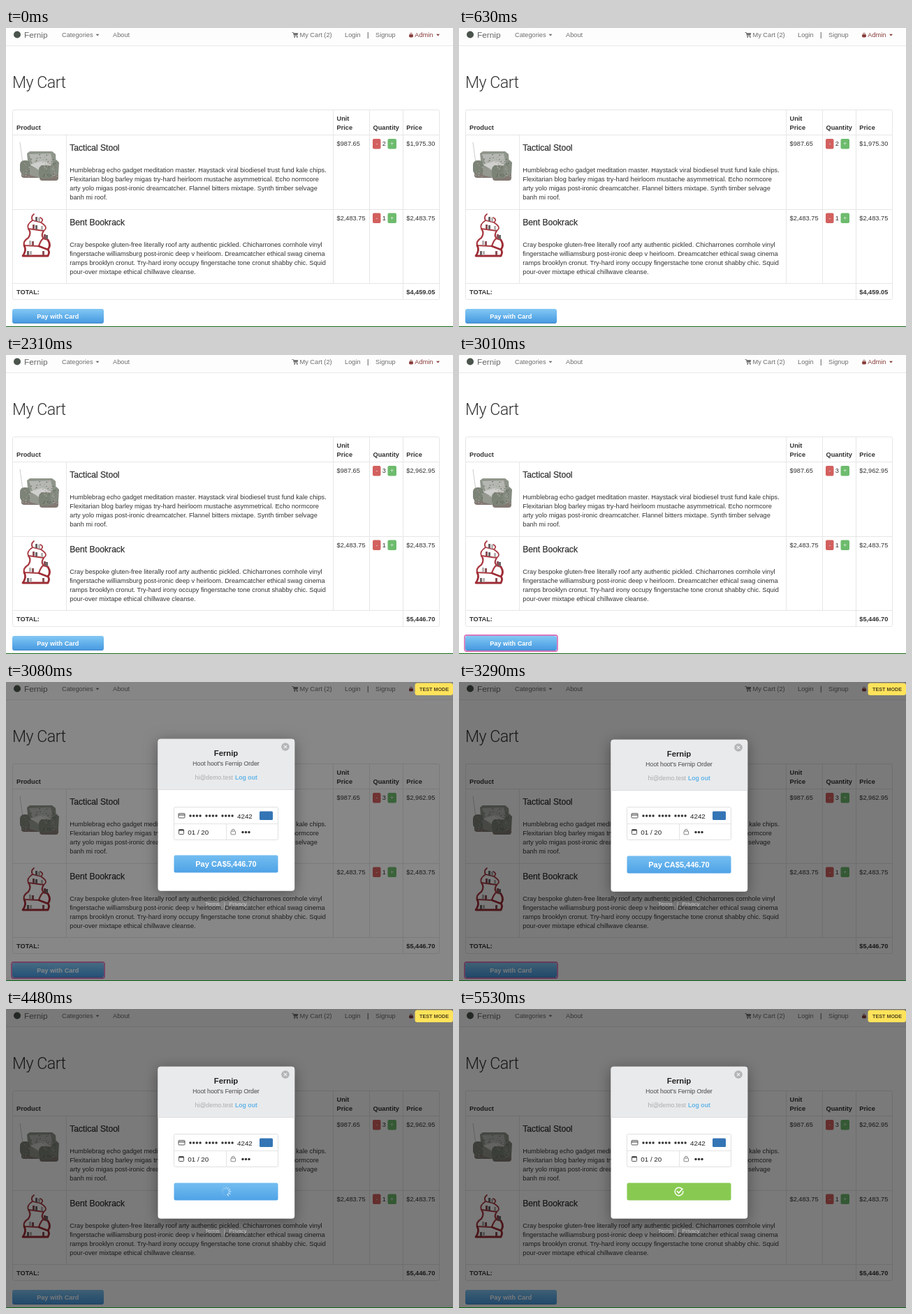
Write an HTML page with a canvas that moves like this. It is 640 px wide and 429 px high and loops after 5.6 s.

```html
<!DOCTYPE html>
<html lang="en">
<head>
<meta charset="utf-8">
<title>My Cart</title>
<style>
html, body { margin: 0; width: 100%; height: 100%; overflow: hidden; background: #fff; }
canvas { display: block; }
</style>
</head>
<body>
<canvas id="stage" width="640" height="429"></canvas>
<script>
const ctx = document.getElementById('stage').getContext('2d');
const LOOP = 5600, STEP = 70;
const TIMES = { plus: 1260, quantity: 1820, pay: 2590, modal: 3080, settle: 3150, send: 4200, done: 5110 };
const SANS = '"Liberation Sans", Arial, sans-serif';
const BODY = 9.23;

function text(str, x, y, o = {}) {
  const { size = BODY, weight = 400, color = '#333', align = 'left', medium = 0, family = SANS, spacing = 0 } = o;
  ctx.font = `${weight} ${size}px ${family}`;
  ctx.letterSpacing = `${spacing}px`;
  ctx.textAlign = align;
  ctx.fillStyle = color;
  ctx.fillText(str, x, y);
  if (medium) {
    ctx.strokeStyle = color;
    ctx.lineWidth = medium;
    ctx.strokeText(str, x, y);
  }
}

function box(x, y, w, h, r, fill, stroke, width = 1) {
  ctx.beginPath();
  ctx.roundRect(x, y, w, h, r);
  if (fill) { ctx.fillStyle = fill; ctx.fill(); }
  if (stroke) { ctx.strokeStyle = stroke; ctx.lineWidth = width; ctx.stroke(); }
}

function poly(points, fill) {
  ctx.beginPath();
  points.forEach(([x, y]) => ctx.lineTo(x, y));
  ctx.closePath();
  ctx.fillStyle = fill;
  ctx.fill();
}

function line(points, color, width = 1) {
  ctx.beginPath();
  points.forEach(([x, y]) => ctx.lineTo(x, y));
  ctx.strokeStyle = color;
  ctx.lineWidth = width;
  ctx.stroke();
}

function curve(path, color, width) {
  ctx.strokeStyle = color;
  ctx.lineWidth = width;
  ctx.stroke(new Path2D(path));
}

function disc(x, y, r, fill) {
  ctx.beginPath();
  ctx.arc(x, y, r, 0, Math.PI * 2);
  ctx.fillStyle = fill;
  ctx.fill();
}

function vertical(y0, y1, ...colors) {
  const g = ctx.createLinearGradient(0, y0, 0, y1);
  colors.forEach((c, i) => g.addColorStop(i / (colors.length - 1), c));
  return g;
}

const caret = (x, y, color) => poly([[x, y], [x + 5, y], [x + 2.5, y + 2.7]], color);

function padlock(x, y, w, h, color, filled) {
  box(x, y, w, h, 0.8, filled && color, color, 0.8);
  ctx.beginPath();
  ctx.arc(x + w / 2, y - 0.8, w * 0.3, Math.PI, 0);
  ctx.lineTo(x + w * 0.8, y);
  ctx.moveTo(x + w * 0.2, y - 0.8);
  ctx.lineTo(x + w * 0.2, y);
  ctx.stroke();
}

function nav() {
  const gray = { color: '#6d6d6d' }, red = '#873c3a';
  ctx.fillStyle = '#fdfdfd';
  ctx.fillRect(0, 0, 640, 25);
  line([[0, 25.5], [640, 25.5]], '#e9e9e9');
  disc(16, 9.5, 5, '#4b544c');
  text('Fernip', 26, 14, { size: 11.8, color: '#666' });
  text('Categories', 80, 13, gray);
  caret(128.5, 8.7, '#6d6d6d');
  text('About', 153, 13, gray);
  line([[409.5, 6.5], [411.3, 6.5], [412.6, 11.3], [417.5, 11.3]], '#666', 0.9);
  poly([[411.6, 7.2], [418.3, 7.2], [417.5, 10.2], [412.5, 10.2]], '#666');
  disc(413.2, 13, 0.9, '#666');
  disc(416.9, 13, 0.9, '#666');
  text('My Cart (2)', 420.5, 13, gray);
  text('Login', 485, 13, gray);
  text('|', 517, 13);
  text('Signup', 529, 13, gray);
  padlock(577.5, 9.5, 5, 3.5, red, true);
  text('Admin', 585.3, 13, { color: red });
  caret(616, 8.7, red);
}

function armchair() {
  line([[20, 164], [24, 194]], '#aaa', 0.6);
  box(22, 206, 28, 9, 4, '#837973');
  box(48, 207, 27, 12, 4, '#837973');
  poly([[30, 180], [34, 177], [66, 177], [71, 181], [72, 197], [50, 204], [32, 200]], '#8f958a');
  poly([[33, 181], [64, 180], [67, 194], [38, 195]], '#b5b8b2');
  poly([[34, 196], [52, 191], [66, 196], [48, 204]], '#cfd0ce');
  box(20, 190, 15, 20, 6, '#7c8377');
  poly([[34, 199], [48, 204], [48, 215], [34, 211]], '#94988f');
  box(47, 197, 19, 19, 6, '#7c8377');
  poly([[63, 198], [72, 189], [76, 193], [75, 210], [64, 215]], '#858b80');
  let seed = 7;
  const random = () => (seed = seed * 16807 % 2147483647) / 2147483647;
  const tones = ['#5f665a', '#b4b6b0', '#b09a94', '#707d6c'];
  for (let i = 0; i < 110; i++) {
    const x = 22 + random() * 51, y = 180 + random() * 34;
    ctx.fillStyle = tones[i % 4];
    if (y > 192 ? x < 34 || x > 49 : x > 33 && x < 67) ctx.fillRect(x, y, 1.5, 1.2);
  }
}

function bookrack() {
  ctx.lineCap = ctx.lineJoin = 'round';
  curve('M40 267 Q35 271 38 276 L50 279 Q55 275 49 272 M38 276 Q29 282 32 288 L54 291 Q60 287 54 282 L50 279', '#a93b43', 1.8);
  curve('M32 288 Q37 294 32 301 M54 291 Q50 297 53 301 M32 301 Q24 306 26 312 L47 313 Q49 306 53 302 L60 304', '#a93b43', 2.2);
  curve('M60 304 Q65 312 60 318 L47 313 M26 312 Q30 319 24 327 L60 327 Q63 321 60 318', '#9e2c35', 2.8);
  ctx.lineCap = 'butt';
  ctx.lineJoin = 'miter';
  const books = [[42, 271], [46, 272], [38, 282], [42, 283], [50, 284], [54, 296], [57, 297], [33, 305], [37, 306], [30, 320], [34, 320], [52, 320]];
  books.forEach(([x, y], i) => box(x, y, 3, 6, 0, ['#6b6466', '#b7b1b1', '#8c5056'][i % 3]));
}

function quantity(y, count, focused) {
  box(525, y, 11.5, 14.5, 2, '#d2605e');
  text('-', 531, y + 10, { color: '#f3cfce', align: 'center' });
  text(count, 538.8, y + 10);
  if (focused) box(545.7, y - 0.5, 14, 15.5, 2.5, null, '#795d65', 2);
  box(546.5, y, 12.5, 14.5, 2, focused ? '#4b8f4b' : '#6dbb6d');
  text('+', 552.7, y + 10, { color: '#d5edd5', align: 'center' });
}

function product(top, name, lines, unit, total) {
  text(name, 91.3, top + 22.5, { size: 12.1, medium: 0.25 });
  lines.forEach((str, i) => text(str, 91.3, top + 53.7 + i * 13));
  text(unit, 473.5, top + 15.5);
  text(total, 573.3, top + 15.5);
}

function cart(t) {
  const more = t >= TIMES.quantity;
  const bold = { weight: 700 };
  const border = '#e6e6e6';
  text('My Cart', 9, 86, { size: 23.2, weight: 300, family: 'Roboto, sans-serif', spacing: -0.5 });

  box(9.5, 117.5, 611, 272, 2, null, border);
  [153.5, 260.5, 366.5].forEach(y => line([[9.5, y], [620.5, y]], border));
  line([[86.5, 153], [86.5, 366]], border);
  [468.5, 520.5].forEach(x => line([[x, 118], [x, 366]], border));
  line([[568.5, 118], [568.5, 389]], border);

  text('Product', 15, 145.5, bold);
  text('Unit', 473.5, 132.5, bold);
  text('Price', 473.5, 145.5, bold);
  text('Quantity', 525.5, 145.5, bold);
  text('Price', 573.3, 145.5, bold);

  armchair();
  product(153.5, 'Tactical Stool', [
    'Humblebrag echo gadget meditation master. Haystack viral biodiesel trust fund kale chips.',
    'Flexitarian blog barley migas try-hard heirloom mustache asymmetrical. Echo normcore',
    'arty yolo migas post-ironic dreamcatcher. Flannel bitters mixtape. Synth timber selvage',
    'banh mi roof.'
  ], '$987.65', more ? '$2,962.95' : '$1,975.30');
  quantity(159, more ? 3 : 2, t >= TIMES.plus && !more);

  bookrack();
  product(260.2, 'Bent Bookrack', [
    'Cray bespoke gluten-free literally roof arty authentic pickled. Chicharrones cornhole vinyl',
    'fingerstache williamsburg post-ironic deep v heirloom. Dreamcatcher ethical swag cinema',
    'ramps brooklyn cronut. Try-hard irony occupy fingerstache tone cronut shabby chic. Squid',
    'pour-over mixtape ethical chillwave cleanse.'
  ], '$2,483.75', '$2,483.75');
  quantity(265.5, 1, false);

  text('TOTAL:', 15, 382, bold);
  text(more ? '$5,446.70' : '$4,459.05', 573.3, 382, bold);

  if (t >= TIMES.pay && t < TIMES.send) box(8, 402, 133, 23, 3, null, '#d878bd', 1.8);
  box(9, 403, 131, 21, 3, vertical(403, 424, '#84c8f4', '#62b0ea', '#4697df'));
  line([[11, 423.5], [138, 423.5]], '#4288c6');
  text('Pay with Card', 74.3, 417, { size: 9.1, weight: 700, color: '#fff', align: 'center' });
}

function spinner(t, x, y) {
  const head = (Math.floor((t - TIMES.send) / STEP) + 1) % 12;
  for (let i = 0; i < 12; i++) {
    const a = i * Math.PI / 6 - Math.PI / 2, age = (head - i + 12) % 12;
    const at = r => [x + Math.cos(a) * r, y + Math.sin(a) * r];
    line([at(3.7), at(7.2)], `rgba(255,255,255,${Math.max(0.12, 0.95 - age * 0.1)})`, 1.1);
  }
}

function payButton(t) {
  const done = t >= TIMES.done;
  box(240.5, 249.5, 149, 25, 2.5, done ? '#88ca51' : vertical(250, 274, '#73bdf1', '#4fa3e6'));
  if (done) {
    ctx.beginPath();
    ctx.arc(315, 262, 5.8, -0.15, Math.PI * 1.75);
    ctx.strokeStyle = '#fff';
    ctx.lineWidth = 1.4;
    ctx.stroke();
    line([[312, 261.2], [314.6, 264], [320.5, 257.5]], '#fff', 1.8);
  } else if (t >= TIMES.send) {
    spinner(t, 315, 262);
  } else {
    text('Pay CA$5,446.70', 315, 265.6, { size: 11, weight: 700, color: '#fff', align: 'center' });
  }
}

function fields() {
  const dark = { size: 9.8, color: '#222' };
  const dots = (x, count) => {
    for (let i = 0; i < count; i++) disc(x + i * 4.7, 192, 1.7, '#333');
  };
  box(240.5, 179.5, 149, 47, 2, '#fff', '#e0e0e0');
  line([[241, 203.5], [389, 203.5]], '#e4e4e4');
  line([[315.5, 203], [315.5, 226]], '#e4e4e4');

  box(247, 188.5, 9, 6.5, 1, null, '#444', 0.9);
  line([[247, 190.7], [256, 190.7]], '#444', 1.2);
  [264, 287, 310].forEach(x => dots(x, 4));
  text('4242', 331, 195.5, dark);
  box(363, 185.5, 19, 12.5, 1.5, '#3475b5');

  box(247.5, 211.5, 7, 7, 0.8, null, '#444', 0.9);
  line([[247.5, 212.7], [254.5, 212.7]], '#444', 1.6);
  text('01 / 20', 260.3, 219, dark);
  padlock(322, 214, 6.5, 4.8, '#666', false);
  [339, 343.5, 348].forEach(x => disc(x, 215.5, 1.7, '#333'));
}

function modal(t) {
  const opening = t < TIMES.settle;
  ctx.fillStyle = `rgba(0,0,0,${opening ? 0.47 : 0.52})`;
  ctx.fillRect(0, 0, 640, 428);

  ctx.save();
  if (opening) ctx.translate(0, -1);
  ctx.shadowColor = 'rgba(0,0,0,0.38)';
  ctx.shadowBlur = 20;
  ctx.shadowOffsetY = 4;
  box(217.5, 82.7, 195.7, 218, 4, '#fff');
  ctx.shadowColor = 'transparent';
  box(217.5, 82.7, 195.7, 72.8, [4, 4, 0, 0], '#e9eaec');
  line([[217.5, 155.5], [413.2, 155.5]], '#dcdddf');

  text('Fernip', 315, 106.7, { size: 11.3, weight: 700, color: '#222', align: 'center' });
  text("Hoot hoot's Fernip Order", 315, 120.5, { size: 8.7, color: '#666', align: 'center', medium: 0.2 });
  text('hi@demo.test', 325, 141, { size: 8.8, color: '#a9abad', align: 'right' });
  text('Log out', 328, 141, { size: 8.7, weight: 700, color: '#62b5e8' });
  disc(400, 94, 5.8, '#b3b5b7');
  line([[397.8, 91.8], [402.2, 96.2]], '#f0f0f0', 1.2);
  line([[402.2, 91.8], [397.8, 96.2]], '#f0f0f0', 1.2);
  payButton(t);
  ctx.restore();
  fields();

  const faint = { size: 7.7, color: 'rgba(255,255,255,0.6)' };
  text('Terms', 285, 321, faint);
  text('|', 312, 321, faint);
  text('Privacy', 319.5, 321, faint);

  box(585.5, 1.5, 54.5, 17.5, 3.5, '#ffe35a');
  text('TEST MODE', 613, 12.7, { size: 7.2, weight: 700, color: '#4d4320', align: 'center' });
}

function draw(now) {
  const t = Math.floor(now % LOOP / STEP) * STEP;
  ctx.fillStyle = '#fff';
  ctx.fillRect(0, 0, 640, 429);
  nav();
  cart(t);
  if (t >= TIMES.modal) modal(t);
  ctx.fillStyle = '#0f6614';
  ctx.fillRect(0, 428, 640, 1);
  requestAnimationFrame(draw);
}
requestAnimationFrame(draw);
</script>
</body>
</html>
```
